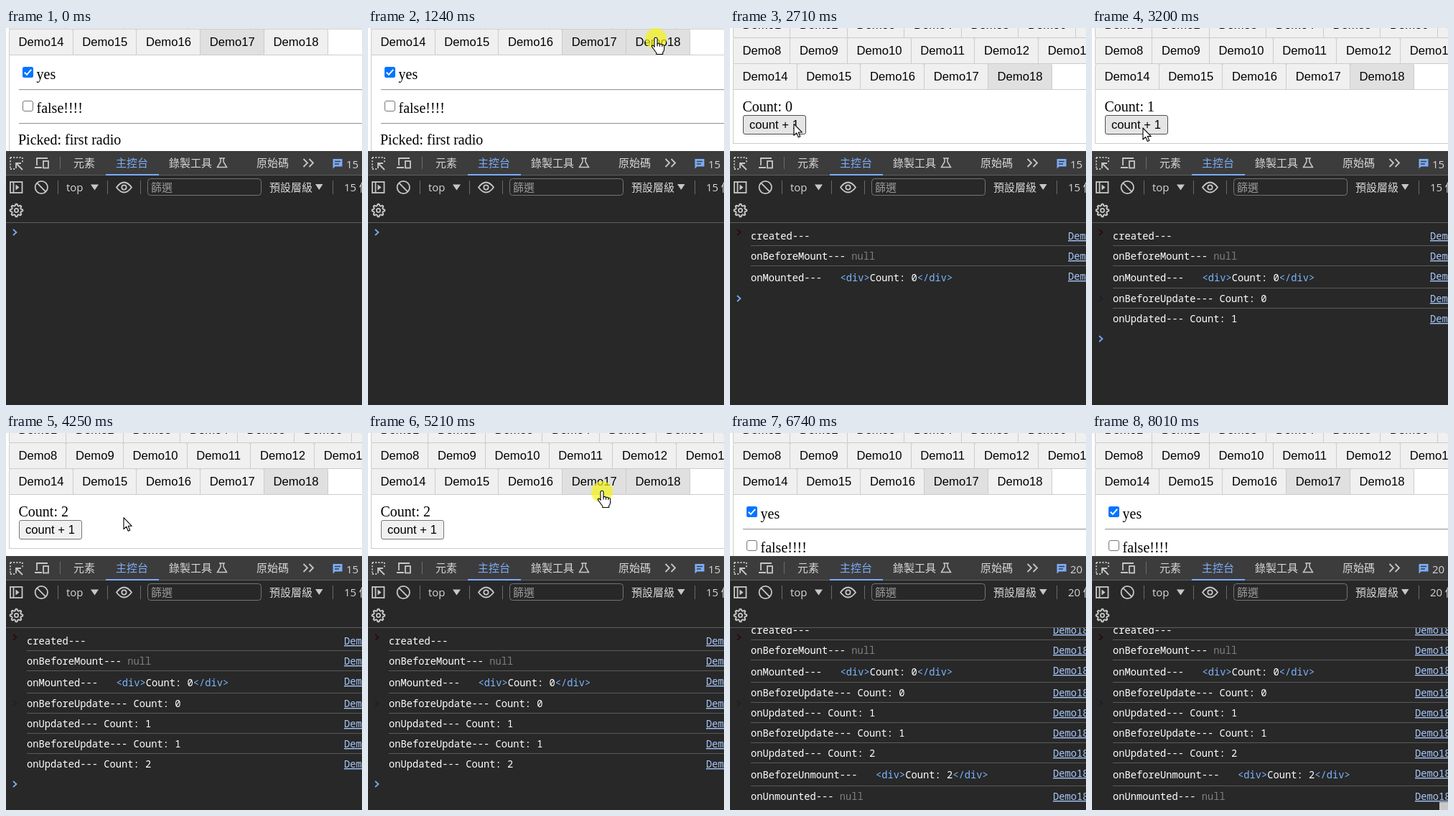
An HTML page for the animation above (8080 ms loop, 496 by 524 pixels).

```html
<!DOCTYPE html>
<html lang="zh-Hant">
<head>
<meta charset="utf-8">
<title>Lifecycle hooks demo</title>
<style>
  html, body { margin: 0; width: 100%; height: 100%; overflow: hidden; background: #fff; }
  svg { display: block; }
  text { white-space: pre; }
  .ui { font: 16.667px "Liberation Sans", Arial, sans-serif; }
  .serif { font: 20px "Liberation Serif", "Times New Roman", serif; }
  .tool { font: 15px "Open Sans", "Noto Sans CJK TC", "Noto Sans CJK", sans-serif; fill: #d6d6d6; }
  .mono { font: 500 13.75px "Noto Sans Mono", monospace; fill: #fff; }
  .tool .on { fill: #7cacf8; }
  .mono .tag { fill: #7cb4ff; }
  .mono .dim { fill: #7f7f7f; }
  .link { fill: #a8c7fa; text-decoration: underline; }
  .icon { fill: none; stroke: #c7c7c7; stroke-width: 1.8; }
  .solid { fill: #c7c7c7; }
  .chevron { fill: none; stroke-width: 1.7; }
  .pointer { fill: #fff; stroke: #000; stroke-width: 1.1; stroke-linejoin: round; }
</style>
</head>
<body>
<svg width="496" height="524" viewBox="0 0 496 524">
  <defs>
    <clipPath id="pageClip"><rect width="496" height="171"/></clipPath>
    <clipPath id="logClip"><rect y="271" width="496" height="253"/></clipPath>
  </defs>

  <g clip-path="url(#pageClip)">
    <g id="page">
      <path d="M4.5 400V85.5H496" fill="none" stroke="#ccc"/>
      <g id="tabs"></g>
      <g id="checks" class="serif">
        <rect x="23" y="102" width="15" height="15" rx="2.5" fill="#0075ff"/>
        <path d="M25.8 109.7l3.2 3.2 6.2-7" fill="none" stroke="#fff" stroke-width="2"/>
        <text x="42.5" y="119">yes</text>
        <rect x="23.5" y="149.5" width="14" height="14" rx="2.5" fill="#fff" stroke="#767676"/>
        <text x="42.5" y="166">false!!!!</text>
        <path d="M18 133.5H496M18 180.5H496" stroke="#9a9a9a"/>
        <path d="M18 134.5H496M18 181.5H496" stroke="#eee"/>
        <text x="17" y="210">Picked: first radio</text>
      </g>
      <g id="counter">
        <path d="M4 160.5H496" stroke="#ccc"/>
        <rect y="161" width="496" height="60" fill="#fff"/>
        <text id="count" class="serif" x="17.5" y="116"></text>
        <rect id="button" x="18.5" y="121.5" width="87" height="26" rx="2.5"/>
        <text class="ui" x="27" y="140">count + 1</text>
      </g>
    </g>
  </g>

  <rect y="171" width="496" height="353" fill="#282828"/>
  <rect y="171" width="496" height="34" fill="#3c3c3c"/>
  <path d="M0 204.5H496M0 270.5H496" stroke="#5e5e5e"/>
  <rect x="139" y="203" width="74" height="2" fill="#7cacf8"/>

  <g class="icon">
    <path d="M6 180H23M6 180V197M6 196H13M23 180V187" stroke-dasharray="2 2.2"/>
    <path d="M23 197l-8-8M14 195v-7h7"/>
    <path d="M43 191V181H58M40 194H50"/><rect x="52" y="185" width="7" height="9.5"/>
    <path d="M75.5 179V196M72.5 212V231M141.5 212V231M187.5 212V231M455.5 212V231" stroke="#6a6a6a" stroke-width="1"/>
    <path d="M297 181H305M299 181V186L294.5 193.5H307.5L303 186V181" stroke-width="1.5"/>
    <path d="M414.5 182l5.5 5.5-5.5 5.5M422.5 182l5.5 5.5-5.5 5.5"/>
    <rect x="6" y="214" width="16.5" height="15"/><path d="M10.5 214V229"/>
    <circle cx="49.3" cy="221.5" r="8.7"/><path d="M43.2 215.4l12.2 12.2"/>
    <path d="M154 221.5Q164.5 207.5 175 221.5Q164.5 235.5 154 221.5Z"/>
    <circle cx="164.5" cy="221.5" r="3.2"/>
    <circle cx="14.5" cy="253.5" r="2.6"/>
    <path id="gear" stroke-width="2" stroke-linejoin="round"/>
  </g>
  <path class="solid" d="M13.5 217.5v8l5-4zM118 217.5h11l-5.5 8zM431 217h10.5l-5.25 8z"/>
  <path d="M455.5 182h13v10.5h-10l-3 3z" fill="#7cacf8"/>
  <path d="M458 185.5h8M458 189h6" stroke="#3c3c3c" stroke-width="1.3"/>
  <rect x="197.5" y="209.5" width="158" height="23" rx="4" fill="none" stroke="#757575"/>

  <g class="tool">
    <text x="94" y="192.5">元素</text>
    <text x="153" y="192.5" class="on">主控台</text>
    <text x="227" y="192.5">錄製工具</text>
    <text x="349" y="192.5">原始碼</text>
    <text id="badge" x="474" y="194.5"></text>
    <text x="84" y="226.5">top</text>
    <text x="202" y="227" style="fill:#9a9a9a">篩選</text>
    <text x="367" y="227">預設層級</text>
    <text id="issues" x="471" y="227"></text>
  </g>

  <g clip-path="url(#logClip)">
    <g id="log" class="mono"></g>
    <g id="ghosts" class="chevron"></g>
    <path id="prompt" class="chevron" d="M10 -4l4.5 4-4.5 4" stroke="#7cacf8"/>
  </g>
  <rect id="corner" x="484" y="513" width="12" height="11" fill="#c8c8c8"/>

  <circle id="halo" r="15" fill="#f4f410" opacity=".68"/>
  <g id="cursor" class="pointer">
    <g id="hand">
      <path d="M-2 14V2.2a2 2 0 0 1 4 0V9q2-1.5 3.5.6 2-1 3.3.8 2.7-.6 2.9 2V16q0 3-2 5V23.5H.8v-2Q-1 19.5-3.3 16-6 13-5.6 11.7-4 10.2-2 13"/>
      <path d="M2 9v3.5M5.5 9.6v3.2M8.8 10.4v2.8" fill="none"/>
    </g>
    <path id="arrow" d="M0 0V16l3.7-3.5 2.6 6 2.5-1.1-2.5-5.8H11.3z"/>
  </g>
</svg>

<script>
const LOOP = 8080;
const OPEN = 1370, FIRST = 3120, SECOND = 3800, LEAVE = 5340;
const $ = id => document.getElementById(id);
const show = (el, on) => { el.style.display = on ? '' : 'none'; };
const move = (el, x, y) => el.setAttribute('transform', `translate(${x} ${y})`);
const label = (el, text) => { if (el.textContent !== text) el.textContent = text; };

// Tab strip: three wrapped rows; tabs overlap by their borders.
const tabs = [];
[[1, 7], [8, 13], [14, 18]].forEach(([from, to], row) => {
  let x = 3.75;
  for (let n = from; n <= to; n++) {
    const width = n < 10 ? 79.5 : 88.75;
    tabs.push({ n, row, x, width, y: -23 + 36 * row });
    x += width;
  }
});
$('tabs').innerHTML = tabs.map(({ n, x, y, width }) => {
  const left = Math.round(x) + .5, right = Math.round(x + width) + .5, top = y + .5;
  return `<path d="M${left} ${top + 36}V${top + 3}q0-3 3-3H${right - 3}q3 0 3 3V${top + 36}z" stroke="#ccc"/>
    <text class="ui" x="${x + 13.75}" y="${y + 24}">Demo${n}</text>`;
}).join('');
const tabShapes = $('tabs').querySelectorAll('path');

let gear = '';
for (let i = 0; i < 32; i++) {
  const r = i % 4 < 2 ? 8.8 : 6.6, a = (i - .5) * Math.PI / 16;
  gear += `${i ? 'L' : 'M'}${14.5 + r * Math.cos(a)} ${253.5 + r * Math.sin(a)}`;
}
$('gear').setAttribute('d', gear + 'z');

// Console rows: [time, message, printed value, kind of value]
const entries = [
  [OPEN, 'created---'],
  [OPEN, 'onBeforeMount--- ', 'null', 'dim'],
  [OPEN, 'onMounted---', 'Count: 0', 'node'],
  [FIRST, 'onBeforeUpdate--- Count: 0'],
  [FIRST, 'onUpdated--- Count: 1'],
  [SECOND, 'onBeforeUpdate--- Count: 1'],
  [SECOND, 'onUpdated--- Count: 2'],
  [LEAVE, 'onBeforeUnmount---', 'Count: 2', 'node'],
  [LEAVE, 'onUnmounted--- ', 'null', 'dim'],
];
let bottom = 274;
const rows = entries.map(([time, message, value, kind], i) => {
  const top = Math.floor(bottom), isNode = kind === 'node';
  bottom += isNode ? 31.5 : 28;
  const dim = kind === 'dim' ? `<tspan class="dim">${value}</tspan>` : '';
  const node = isNode ? `<text x="${29.75 + (message.length + 3) * 8.25}" y="${top + 22}"><tspan class="tag">&lt;div&gt;</tspan>${value}<tspan class="tag">&lt;/div&gt;</tspan></text>` : '';
  const markup = `<g>${i ? `<path d="M29 ${top + .5}H496" stroke="#5a5a5a"/>` : ''}
    <text x="29" y="${top + (isNode ? 22 : 20)}">${message}${dim}</text>${node}
    <text class="link" y="${top + 20}">Demo18.vue</text></g>`;
  return { time, bottom: Math.floor(bottom), markup };
});
$('log').innerHTML = rows.map(r => r.markup).join('');
const rowShapes = [...$('log').children];
const links = $('log').querySelectorAll('.link');

// Faint traces left where the prompt stood earlier.
const ghosts = [[OPEN, 284, '#2c0a0a'], [FIRST, 376, '#1d1d36']];
$('ghosts').innerHTML = ghosts.map(([, y, color]) =>
  `<path d="M10 ${y - 4}l4.5 4-4.5 4" stroke="${color}"/>`).join('');

// Pointer trips: start, end, steps, then [progress, x, y] way points.
const trips = [
  [120, 910, 12, [0, 463, 450], [.08, 460, 434], [.5, 432, 200], [.8, 405, 40], [1, 401, 13]],
  [2160, 2780, 10, [0, 401, 13], [.3, 313, 57], [.7, 125, 122], [1, 71, 139]],
  [4190, 4880, 11, [0, 71, 139], [.35, 250, 98], [.65, 420, 62], [1, 326, 80]],
  [5410, 5470, 2, [0, 326, 80], [1, 324, 80]],
  [5730, 5860, 2, [0, 324, 80], [1, 323, 81]],
  [6410, 6740, 6, [0, 323, 81], [.5, 400, 230], [.84, 484, 489], [1, 500, 530]],
];
const clicks = [[1240, 1370], [3050, 3200], [3730, 3860], [5210, 5470]];

function pointerAt(t) {
  const trip = trips.filter(([start]) => start <= t).pop();
  if (!trip || t >= 6740) return null;
  const [start, end, steps, ...points] = trip;
  const step = Math.min(steps - 1, Math.floor((t - start) / (end - start) * (steps - 1) + .2));
  const p = (step + 1) / steps;
  const next = Math.max(1, points.findIndex(([at]) => at >= p - 1e-6));
  const [p0, x0, y0] = points[next - 1], [p1, x1, y1] = points[next];
  const k = (p - p0) / (p1 - p0);
  return { x: x0 + (x1 - x0) * k, y: y0 + (y1 - y0) * k };
}

function render(t) {
  const counting = t >= OPEN && t < LEAVE;
  const scroll = t < OPEN ? 48 : 0;
  const active = counting ? 18 : 17;
  const at = pointerAt(t);
  const inside = (x, y, w, h) => !!at && at.y < 171 && at.x >= x && at.x < x + w
    && at.y + scroll >= y && at.y + scroll < y + h;

  move($('page'), 0, -scroll);
  show($('checks'), !counting);
  show($('counter'), counting);
  label($('count'), 'Count: ' + (t < FIRST ? 0 : t < SECOND ? 1 : 2));
  let overTab = false;
  tabs.forEach(({ n, row, x, y, width }, i) => {
    const over = inside(x, y, width, 36);
    overTab = overTab || over;
    tabShapes[i].setAttribute('fill', n === active || over && row === 2 ? '#e0e0e0' : '#f0f0f0');
  });
  const overButton = counting && inside(18, 121, 88, 27);
  $('button').setAttribute('fill', overButton ? '#e5e5e5' : '#f0f0f0');
  $('button').setAttribute('stroke', overButton ? '#4f4f4f' : '#767676');

  const left = t >= LEAVE;
  const total = left ? '20' : '15';
  label($('badge'), total);
  label($('issues'), total + ' 個問題');
  rowShapes.forEach((el, i) => show(el, t >= rows[i].time));
  links.forEach(el => el.setAttribute('x', left ? 450 : 471));
  move($('log'), 0, left ? -15 : 0);
  const last = rows.filter(r => r.time <= t).pop();
  move($('prompt'), 0, last ? last.bottom + 15 : 284);
  [...$('ghosts').children].forEach((el, i) => show(el, t >= ghosts[i][0]));
  show($('corner'), t >= 7870);

  show($('cursor'), at);
  show($('halo'), at && clicks.some(([from, to]) => t >= from && t < to));
  if (at) {
    move($('cursor'), at.x, at.y);
    move($('halo'), at.x, at.y + 2);
    show($('hand'), overTab);
    show($('arrow'), !overTab);
  }
}

function tick() {
  render(performance.now() % LOOP);
  requestAnimationFrame(tick);
}
tick();
</script>
</body>
</html>
```
